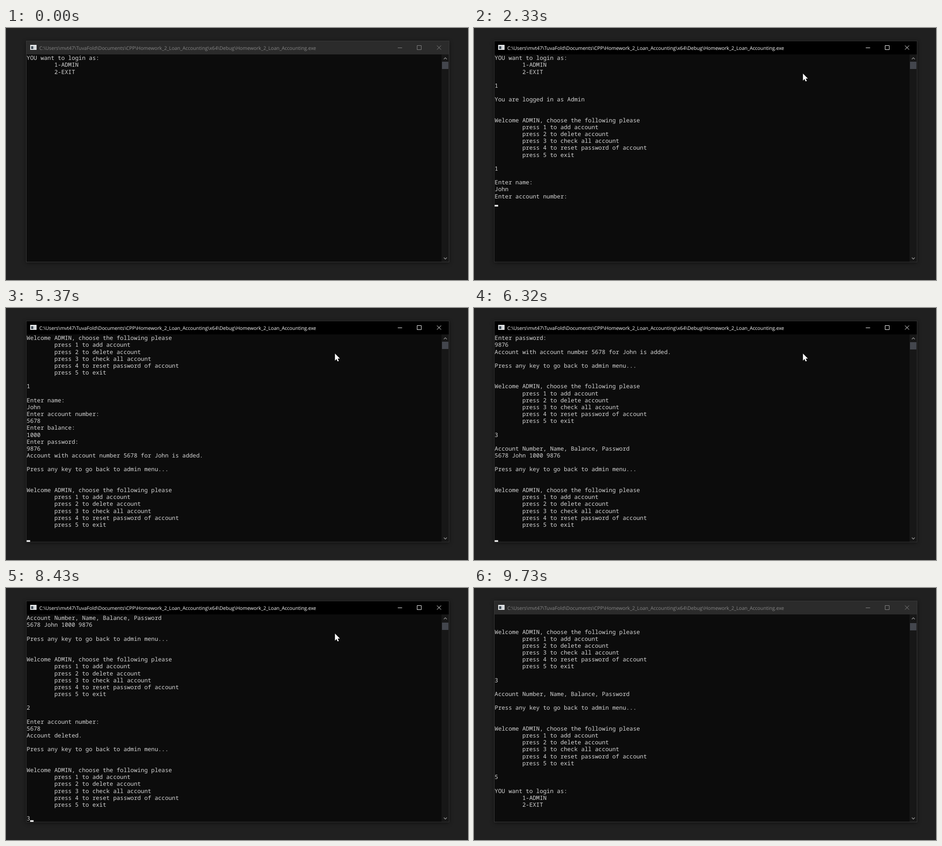
Animation, 1013 px wide and 553 px high, one loop 9750 ms. Source, as an HTML page:

```html
<!DOCTYPE html>
<html lang="en">
<head>
<meta charset="utf-8">
<title>Console session</title>
<style>
  html, body { margin: 0; width: 100%; height: 100%; overflow: hidden; background: #202020; }
  svg { display: block; width: 1013px; height: 553px; }
  text { text-rendering: geometricPrecision; white-space: pre; }
  .window { fill: #3a3a3a; filter: drop-shadow(0 2px 5px rgba(0, 0, 0, .45)); }
  #lines { font: 12.65px "Noto Sans Mono", "DejaVu Sans Mono", monospace; fill: #d6d6d6; }
  #title { font: 10.7px "Open Sans", "Noto Sans", sans-serif; }
  #bar { fill: #2b2b2b; }
  #head { color: #868686; }
  .focus .window { fill: #323232; }
  .focus #bar { fill: #000; }
  .focus #head { color: #fff; }
  .icon { fill: none; stroke: currentColor; }
  .arrow { fill: none; stroke: #8c8c8c; stroke-width: 1.5; }
  #mouse { fill: #fff; stroke: #000; paint-order: stroke; }
</style>
</head>
<body>
<svg id="stage" viewBox="0 0 1013 553">
  <rect width="1013" height="553" fill="#202020"/>
  <rect class="window" x="44" y="28" width="928" height="486"/>
  <rect id="bar" x="45" y="29" width="926" height="29"/>
  <rect x="45" y="58" width="926" height="455" fill="#0c0c0c"/>

  <rect x="53" y="37" width="14" height="11" fill="#e4e6e8"/>
  <rect x="55" y="40" width="5" height="6" fill="#45525c"/>
  <rect x="61" y="40" width="4" height="6" fill="#cfd3d6"/>

  <g id="head">
    <text id="title" x="73" y="47.5" fill="currentColor">C:\Users\mvt47\TuvaFold\Documents\CPP\Homework_2_Loan_Accounting\x64\Debug\Homework_2_Loan_Accounting.exe</text>
    <path class="icon" d="M859 43.5h9.5M901.5 38.5h9v9h-9zM945 38.5l9 9M954 38.5l-9 9"/>
  </g>

  <rect x="955" y="58" width="16" height="455" fill="#171717"/>
  <rect id="thumb" x="956" y="74" width="14" height="16" fill="#43464d"/>
  <path class="arrow" d="M960 68.5l3.3-3.3 3.3 3.3M960 503.8l3.3 3.3 3.3-3.3"/>

  <g id="lines"></g>
  <rect id="caret" width="7.6" height="3.6" fill="#eee"/>
  <path id="mouse" d="M0 0V15.4L3.5 12.1 5.8 17.3 8.4 16.2 6.1 11.1H10.8Z"/>
</svg>
<script>
const LOOP = 9750, ROWS = 30, COL = 7.592, ROW = 15.172, LEFT = 45.3, TOP = 58;
const $ = id => document.getElementById(id);

const LOGIN = 'YOU want to login as:\n\t1-ADMIN\n\t2-EXIT\n\n';
const MENU = 'Welcome ADMIN, choose the following please\n' +
  ['add account', 'delete account', 'check all account', 'reset password of account', 'exit']
    .map((item, i) => `\tpress ${i + 1} to ${item}\n`).join('') + '\n';
const PAUSE = '\n\nPress any key to go back to admin menu...';
const LIST = '\n\nAccount Number, Name, Balance, Password';

// Console output: [time, text], in order
const output = [];
const print = (time, text) => output.push([time, text]);
const type = (time, gap, text) => [...text].forEach((c, i) => print(time + i * gap, c));

print(0, LOGIN);
type(690, 0, '1');
print(840, '\n\nYou are logged in as Admin\n\n\n' + MENU);
type(1120, 0, '1');
print(1190, '\n\nEnter name:\n');
type(1650, 110, 'John');
print(2290, '\nEnter account number:\n');
type(2640, 110, '5678');
print(3250, '\nEnter balance:\n');
type(3500, 45, '1000');
print(3720, '\nEnter password:\n');
type(3990, 120, '9876');
print(4680, '\nAccount with account number 5678 for John is added.' + PAUSE);
print(5150, '\n\n\n' + MENU);
type(5800, 0, '3');
print(6180, LIST + '\n5678 John 1000 9876' + PAUSE);
print(6320, '\n\n\n' + MENU);
type(6900, 0, '2');
print(7230, '\n');
print(7250, '\nEnter account number:\n');
type(7470, 70, '5678');
print(7880, '\nAccount deleted.' + PAUSE);
print(8120, '\n\n\n' + MENU);
type(8430, 0, '3');
print(8490, LIST + PAUSE);
print(8780, '\n\n\n' + MENU);
type(8960, 0, '5');
print(9130, '\n\n' + LOGIN);

const FOCUS = [560, 9730];
const BLINKS = [[840, 1050], [1330, 1600], [2090, 2180], [2420, 2600], [4850, 5000], [5590, 5780], [6500, 6760]];
const within = (t, [from, to]) => t >= from && t < to;

const rows = Array.from({ length: ROWS }, (_, i) => {
  const row = document.createElementNS('http://www.w3.org/2000/svg', 'text');
  row.setAttribute('x', LEFT);
  row.setAttribute('y', Math.round(TOP + 12.2 + i * ROW));
  return $('lines').appendChild(row);
});

function glide(t, [start, end], [x0, y0], [x1, y1]) {
  const p = Math.min(1, Math.max(0, (t - start) / (end - start)));
  const e = p * p * (3 - 2 * p);
  return [x0 + (x1 - x0) * e, y0 + (y1 - y0) * e];
}

function show(el, visible) {
  el.setAttribute('visibility', visible ? 'visible' : 'hidden');
}

function drawConsole(t, focused) {
  const text = output.filter(([time]) => time <= t).map(o => o[1]).join('');
  const lines = text.replace(/\t/g, ' '.repeat(8)).split('\n');
  const scroll = Math.max(0, lines.length - ROWS);
  rows.forEach((row, i) => {
    const line = lines[scroll + i] || '';
    if (row.textContent !== line) row.textContent = line;
  });
  $('thumb').setAttribute('y', 74 + Math.round(scroll * .047));

  const last = lines.length - 1;
  $('caret').setAttribute('x', LEFT + lines[last].length * COL);
  $('caret').setAttribute('y', TOP + (last - scroll + 1) * ROW - 3.6);
  show($('caret'), focused && !BLINKS.some(b => within(t, b)));
}

function drawMouse(t) {
  const rest = [721.3, 100];
  const [x, y] = t < 5000
    ? glide(t, [60, 530], [966, 343], rest)
    : glide(t, [9240, 9700], rest, [990, 537]);
  $('mouse').setAttribute('transform', `translate(${x} ${y})`);
  show($('mouse'), within(t, [90, 9730]));
}

function frame() {
  const t = performance.now() % LOOP;
  const focused = within(t, FOCUS);
  $('stage').classList.toggle('focus', focused);
  drawConsole(t, focused);
  drawMouse(t);
  requestAnimationFrame(frame);
}
frame();
</script>
</body>
</html>
```
